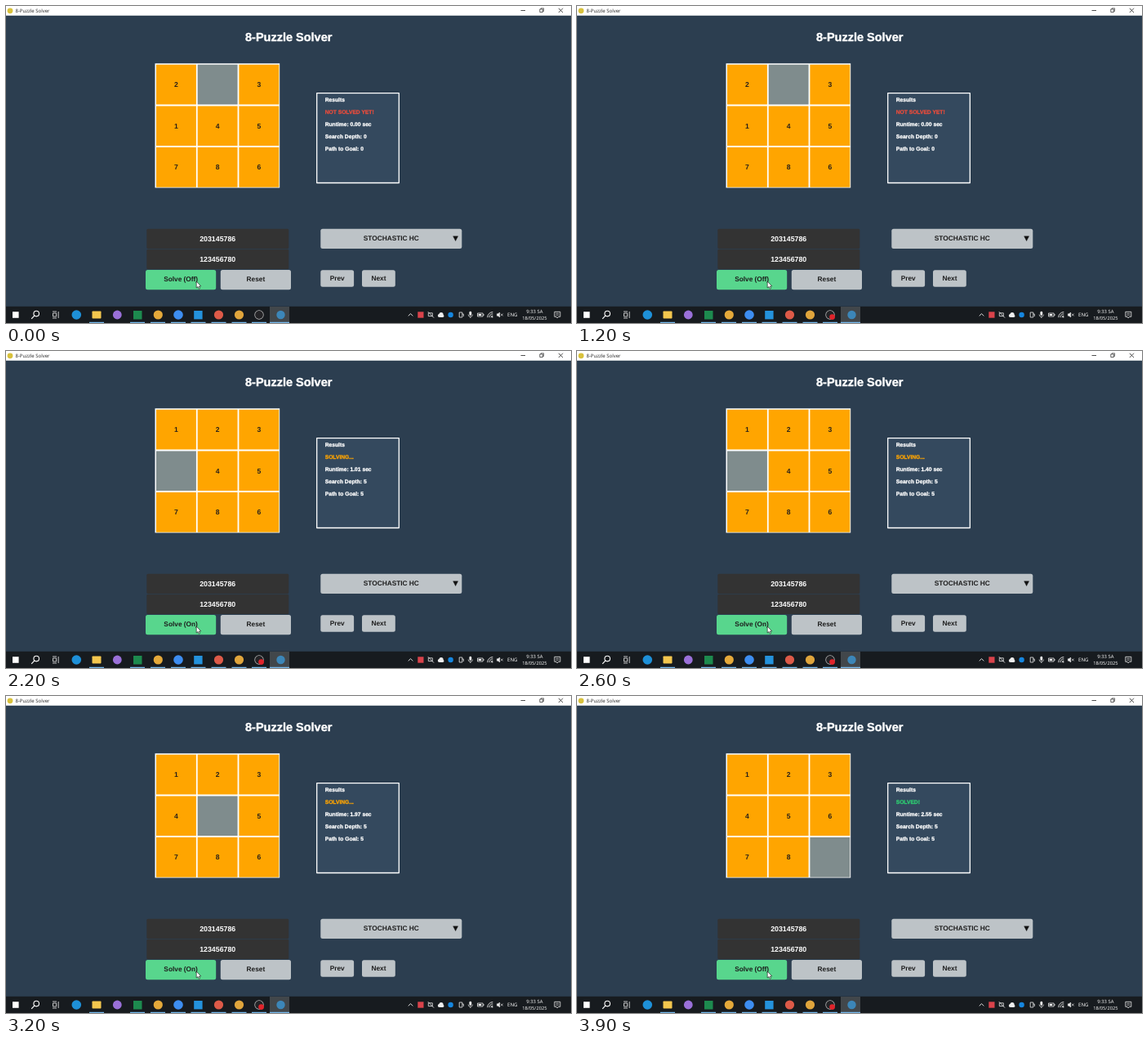
An HTML page with a canvas that plays this animation: 692x388 px, repeating every 5.7 s.

```html
<!DOCTYPE html>
<html lang="en">
<head>
<meta charset="utf-8">
<title>8-Puzzle Solver</title>
<style>
html, body { margin: 0; width: 100%; height: 100%; overflow: hidden; background: #2c3e50; }
canvas { display: block; width: 692px; height: 388px; }
</style>
</head>
<body>
<canvas id="stage" width="692" height="388"></canvas>
<script>
const ctx = document.getElementById('stage').getContext('2d');
ctx.textRendering = 'geometricPrecision';

const LOOP = 5700, TICK = 100;
const START = 1300, SOLVED = 3800, REC = 300;
const BLANKS = [1, 0, 3, 4, 5, 8];
// [ms, seconds shown]
const CLOCK = [[1200, 0], [1700, 0.51], [2200, 1.01], [2800, 1.6], [3200, 1.97], [3800, 2.55]];
const SANS = '"Liberation Sans", Arial, sans-serif';
const UI = '"Open Sans", "Noto Sans", sans-serif';

function rect(x, y, w, h, fill, r = 0) {
  ctx.fillStyle = fill;
  ctx.beginPath();
  ctx.roundRect(x, y, w, h, r);
  ctx.fill();
}

function dot(x, y, r, fill) {
  ctx.fillStyle = fill;
  ctx.beginPath();
  ctx.arc(x, y, r, 0, Math.PI * 2);
  ctx.fill();
}

function line(points, color, width = 0.9, fill) {
  ctx.beginPath();
  points.forEach(([x, y]) => ctx.lineTo(x, y));
  if (fill) {
    ctx.closePath();
    ctx.fillStyle = fill;
    ctx.fill();
  }
  ctx.strokeStyle = color;
  ctx.lineWidth = width;
  ctx.stroke();
}

function box(x, y, w, h, color, width = 0.9) {
  ctx.strokeStyle = color;
  ctx.lineWidth = width;
  ctx.strokeRect(x, y, w, h);
}

function arc(x, y, r, from, to, color, width = 0.9) {
  ctx.beginPath();
  ctx.arc(x, y, r, from, to);
  ctx.strokeStyle = color;
  ctx.lineWidth = width;
  ctx.stroke();
}

// y is the middle of the capitals
function text(str, x, y, size, color, { align = 'center', font = SANS, weight = 'bold', heavy = 0 } = {}) {
  ctx.font = `${weight} ${size}px ${font}`;
  ctx.textAlign = align;
  ctx.fillStyle = color;
  ctx.fillText(str, x, y + size * 0.36);
  if (heavy) {
    ctx.strokeStyle = color;
    ctx.lineWidth = heavy;
    ctx.lineJoin = 'round';
    ctx.strokeText(str, x, y + size * 0.36);
  }
}

function runtime(t) {
  if (t <= CLOCK[0][0]) return 0;
  for (let i = 1; i < CLOCK.length; i++) {
    const [t0, a] = CLOCK[i - 1], [t1, b] = CLOCK[i];
    if (t <= t1) return a + (b - a) * (t - t0) / (t1 - t0);
  }
  return CLOCK[CLOCK.length - 1][1];
}

function boardAt(step) {
  const cells = [...'203145786'];
  for (let i = 1; i <= step; i++) {
    const a = BLANKS[i - 1], b = BLANKS[i];
    [cells[a], cells[b]] = [cells[b], cells[a]];
  }
  return cells;
}

function drawTitleBar() {
  rect(0, 0, 692, 11.7, '#fff');
  dot(5, 5.8, 3.4, '#d8c13c');
  text('8-Puzzle Solver', 11.5, 5.8, 6, '#222', { align: 'left', font: UI, weight: 'normal' });
  line([[630.5, 5.5], [636, 5.5]], '#222', 0.8);
  box(653.8, 3.9, 3.6, 3.6, '#222', 0.7);
  line([[655, 3.8], [655, 2.8], [658.6, 2.8], [658.6, 6.4], [657.5, 6.4]], '#222', 0.6);
  line([[676.8, 2.8], [682, 8]], '#222', 0.8);
  line([[682, 2.8], [676.8, 8]], '#222', 0.8);
}

function drawBoard(cells) {
  rect(182.5, 70.3, 152.7, 152.2, '#fff');
  cells.forEach((n, i) => {
    const x = 184 + (i % 3) * 50.7, y = 71.7 + Math.floor(i / 3) * 50.7;
    rect(x, y, 48.9, 48.7, n === '0' ? '#7f8c8d' : '#ffa500');
    if (n !== '0') text(n, x + 24.4, y + 24.3, 8.6, '#2b2118');
  });
}

function drawResults(t) {
  const solving = t >= START && t < SOLVED;
  const [status, color] = t < START ? ['NOT SOLVED YET!', '#e74c3c']
    : solving ? ['SOLVING...', '#ffa500'] : ['SOLVED!', '#2ecc71'];
  const depth = t < START ? 0 : 5;
  rect(380.6, 106.6, 100.8, 110, '#34495e');
  box(380.7, 106.7, 100.6, 109.8, '#fff', 1.3);
  const rows = ['Results', status, `Runtime: ${runtime(t).toFixed(2)} sec`,
    `Search Depth: ${depth}`, `Path to Goal: ${depth}`];
  rows.forEach((row, i) =>
    text(row, 390.7, 114.6 + i * 15.1, 6.7, i === 1 ? color : '#fff', { align: 'left', heavy: 0.3 }));
}

function button(label, x, y, w, h, fill = '#bdc3c7') {
  rect(x, y, w, h, fill, 2.5);
  text(label, x + w / 2, y + h / 2 - 0.6, 8.3, '#1c1c1c');
}

function drawControls(t) {
  ['203145786', '123456780'].forEach((s, i) => {
    rect(172.3, 272.8 + i * 25, 174, 24.2, '#333', 1.5);
    text(s, 259.2, 284.4 + i * 25, 8.8, '#fff');
  });
  const on = t >= START && t < SOLVED;
  button(`Solve (${on ? 'On' : 'Off'})`, 171, 323, 86.2, 24.2, '#58d68d');
  button('Reset', 262.8, 323, 86.2, 24.2);
  button('STOCHASTIC HC', 385.3, 272.8, 173, 24.2);
  line([[547.6, 281.8], [553.6, 281.8], [550.6, 287.6]], '#111', 0.4, '#111');
  button('Prev', 385.3, 323.2, 40.8, 20.6);
  button('Next', 436, 323.2, 40.8, 20.6);
}

function drawCursor() {
  line([[233.2, 337], [233.2, 345], [235, 343.5], [236.2, 346.2], [237.5, 345.6],
    [236.4, 343], [238.8, 342.9], [233.2, 337]], '#111', 0.6, '#fff');
}

function drawApps(t) {
  rect(323, 368, 24, 20, '#42474b');
  rect(8, 374.2, 7.6, 7.6, '#fff');

  arc(37.2, 376.6, 3.3, 0, Math.PI * 2, '#fff', 1.1);
  line([[34.8, 379.2], [31.2, 382.8]], '#fff', 1.2);
  box(57.5, 376, 4.2, 4, '#eee', 0.8);
  line([[57, 374], [62, 374]], '#eee', 0.8);
  line([[57, 382], [62, 382]], '#eee', 0.8);
  line([[64.2, 374], [64.2, 382]], '#eee', 0.8);

  dot(86.3, 378, 5.8, '#1e90d8');
  rect(105.5, 373.5, 11, 9, '#f3c64e', 0.8);
  dot(136.3, 378, 5.4, '#9a70d8');
  rect(156, 373, 10.5, 10.5, '#1d8a4e');
  dot(186.3, 378, 5.6, '#e5a93a');
  dot(211, 378, 5.8, '#3d8df0');
  rect(230.2, 373, 10.4, 10.4, '#2492dc');
  dot(260.5, 378, 5.6, '#dd5a48');
  dot(285.5, 378, 5.6, '#e0a53c');
  dot(310, 378, 5.7, '#b9b9b9');
  dot(310, 378, 4.9, '#232326');
  if (t >= REC) dot(312.6, 380.6, 3.4, '#e0242b');
  dot(336.5, 378, 5.2, '#3c86b8');

  [111, 161, 186, 211, 235.5, 260.5, 285.5, 310].forEach(x => rect(x - 9, 386.8, 18, 1.2, '#76b9ed'));
  rect(323, 386.8, 24, 1.2, '#76b9ed');
}

function drawTray() {
  const ink = '#eee';
  line([[492.7, 379.4], [495.5, 376.6], [498.3, 379.4]], ink);
  rect(504.3, 374.3, 7.2, 7.4, '#d9434b');

  box(517.3, 375.8, 5, 3.8, ink, 0.8);
  line([[516.8, 374.2], [524, 381.6]], ink, 0.8);

  dot(530.8, 378.9, 2, ink);
  dot(533, 377.6, 2.6, ink);
  rect(530.8, 378, 5.6, 2.9, ink, 1.4);

  dot(544.6, 378, 3.2, '#1687e0');

  box(555.2, 375, 3.6, 6, ink, 0.8);
  line([[558.8, 377], [560.3, 377], [560.3, 380]], ink, 0.8);

  rect(567.4, 373.8, 2.8, 5, ink, 1.4);
  arc(568.8, 377.6, 2.7, 0, Math.PI, ink, 0.7);
  line([[568.8, 380.3], [568.8, 382]], ink, 0.8);

  box(577.5, 376, 6.6, 4, ink, 0.8);
  rect(578.6, 377, 3.6, 2, ink);
  rect(584.5, 377, 0.9, 2, ink);

  [2.2, 4.4, 6.6].forEach(r => arc(596.3, 381.2, r, Math.PI, Math.PI * 1.5, ink, 0.9));
  dot(595.7, 380.7, 0.8, ink);

  line([[601.4, 376.8], [602.8, 376.8], [604.6, 375], [604.6, 381], [602.8, 379.2], [601.4, 379.2]], ink, 0.6, ink);
  line([[606, 376.6], [608.6, 379.4]], ink, 0.7);
  line([[608.6, 376.6], [606, 379.4]], ink, 0.7);

  const style = { font: UI, weight: 'normal' };
  text('ENG', 620.2, 378, 6.1, '#fff', style);
  text('9:33 SA', 647.3, 373.4, 5.9, '#fff', style);
  text('18/05/2025', 647.3, 382.2, 5.7, '#fff', style);
  line([[671.8, 374.3], [678.8, 374.3], [678.8, 380.3], [676.5, 380.3], [675.2, 382],
    [674, 380.3], [671.8, 380.3], [671.8, 374.3]], ink, 0.8);
  line([[673.3, 376.3], [677.3, 376.3]], ink, 0.6);
  line([[673.3, 378.2], [677.3, 378.2]], ink, 0.6);
}

function draw(t) {
  rect(0, 0, 692, 388, '#2c3e50');
  drawTitleBar();
  text('8-Puzzle Solver', 346.2, 38, 14.5, '#fff', { heavy: 0.4 });
  drawBoard(boardAt(Math.floor(runtime(t) / 0.5)));
  drawResults(t);
  drawControls(t);
  drawCursor();
  rect(0, 367.8, 692, 20.2, '#171b1f');
  drawApps(t);
  drawTray();
}

function loop() {
  const t = performance.now() % LOOP;
  draw(Math.floor(t / TICK) * TICK);
  requestAnimationFrame(loop);
}
loop();
</script>
</body>
</html>
```
